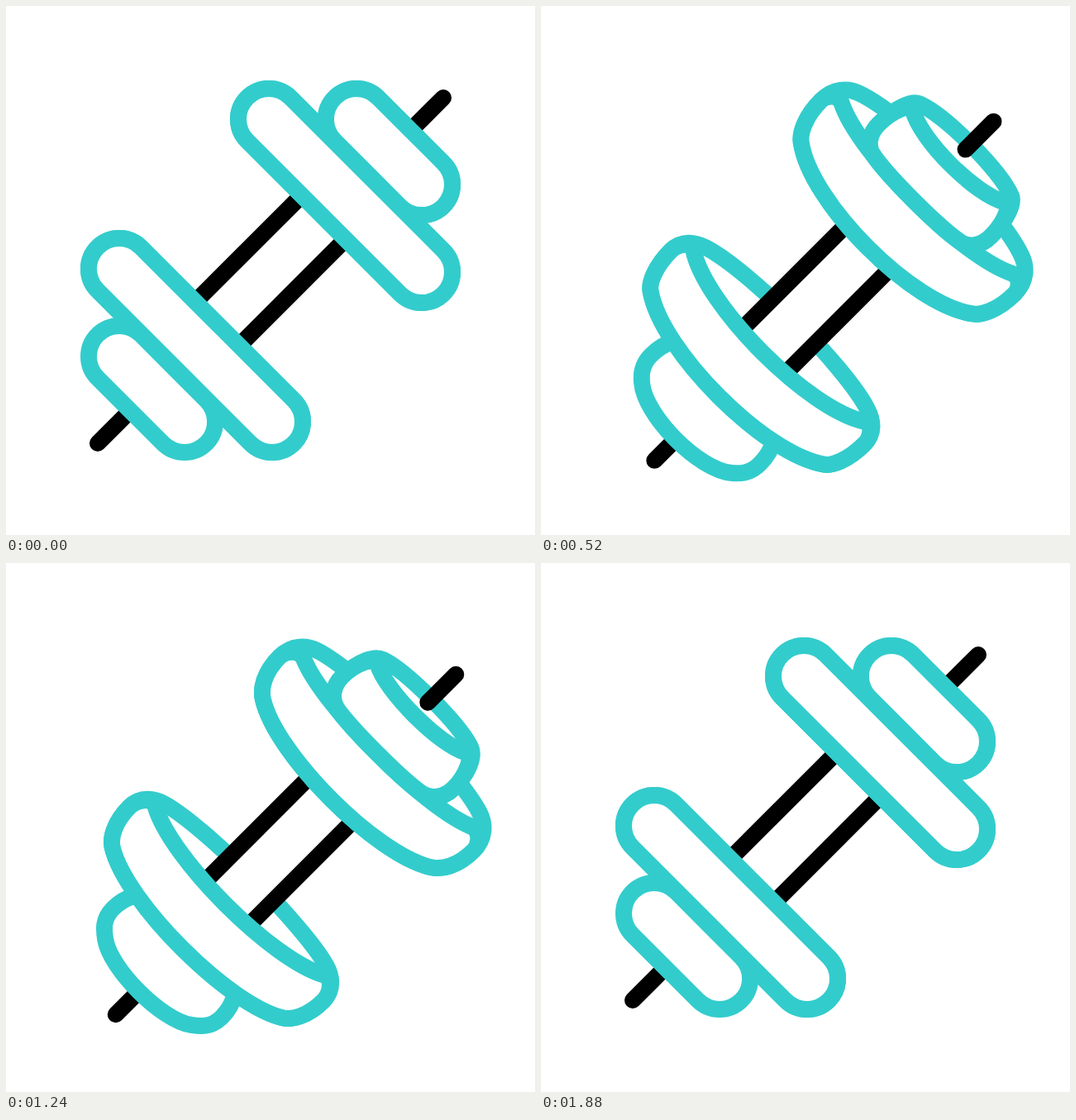
Write an HTML page that moves like this. It is 640x640 px and loops after 2400 ms.

```html
<!DOCTYPE html>
<html>
<head>
<meta charset="utf-8">
<style>
html, body { margin: 0; height: 100%; overflow: hidden; background: #fff; }
svg { display: block; width: 100vw; height: 100vh; }
path { fill: none; stroke-width: 20; stroke-linejoin: round; }
.plate { fill: #fff; stroke: #3cc; }
.bar { stroke: #000; }
.round { stroke-linecap: round; }
.grip { stroke: #fff; stroke-width: 75; }
</style>
</head>
<body>
<svg viewBox="0 0 640 640"><g id="dumbbell"></g></svg>
<script>
const group = document.getElementById('dumbbell');
const mix = (a, b, p) => a + (b - a) * p;
const ROUND = 0.5523;

// Local axes: u runs along the bar to the upper right, v across it.
// A plate is symmetric in v. Its pose is a left edge (u, half height, bulge),
// a tip (u, half height) and a right edge like the left one.
function capsule(u, half) {
  const r = 37;
  return [u - r, half, 0, u, half + r, u + r, half, 0];
}

// Curve handles of one side: the edge's own, and one carrying its tangent on to the tip
function handles(u, v, bulge, tipV) {
  const edge = [u + bulge * 4 / 3, v * 0.6];
  const du = u - edge[0], dv = v - edge[1];
  const reach = ROUND * (tipV - v) / Math.hypot(du, dv);
  return [edge, [u + du * reach, v + dv * reach]];
}

function outline([lu, lv, lBulge, tu, tv, ru, rv, rBulge]) {
  const [lEdge, lTip] = handles(lu, lv, lBulge, tv);
  const [rEdge, rTip] = handles(ru, rv, rBulge, tv);
  const half = [
    lEdge, [lu, lv], lTip, [mix(tu, lu, ROUND), tv], [tu, tv],
    [mix(tu, ru, ROUND), tv], rTip, [ru, rv], rEdge
  ];
  const mirrored = half.map(([u, v]) => [u, -v]).reverse();
  const loop = [...half, ...mirrored];
  return `M${loop[1]}C${[...loop.slice(2), loop[0], loop[1]].join(' ')}Z`;
}

const parts = [];
function add(className, path) {
  const el = document.createElementNS('http://www.w3.org/2000/svg', 'path');
  el.setAttribute('class', className);
  group.append(el);
  parts.push({ el, path });
}
const plate = (rest, ...turned) => {
  const pose = turned.flat();
  add('plate', p => outline(rest.map((n, i) => mix(n, pose[i], p))));
};
const rod = (className, v) =>
  add(className, p => `M${mix(-92, -109, p)},${v}H${mix(91, 71, p)}`);

const big = capsule(128, 130.8), small = capsule(202.9, 55.9);
const bigLow = capsule(-128, 130.8), smallLow = capsule(-202.9, 55.9);

// Left edge and tip of the turned plates, shared by the rim and the face behind it
const bigLeft = [109, 150, -39.5, 165, 165];
const lowLeft = [-147, 152, -38, -92, 165];
const smallLeft = [155.5, 79, -5.5, 185, 96.5];

// Back to front
add('bar round', p => `M${mix(-295.6, -291, p)},0H-250`);
plate(smallLow, [-235.5, 81, -23, -205, 93], [-162, 72, 0]);
plate(bigLow, lowLeft, [-61, 140, 16]);
rod('grip', 0);
rod('bar', -37.5);
rod('bar', 37.5);
plate(bigLow, lowLeft, [-76, 150, -34]);
plate(big, bigLeft, [203, 142, 19]);
plate(big, bigLeft, [176, 149, -26]);
plate(small, smallLeft, [240, 83, 11]);
add('bar round', p => `M${mix(295.6, 287, p)},0h-48`);
plate(small, smallLeft, [227, 83, -17]);

// cubic-bezier(.62, 0, .38, 1), solved around its midpoint
function ease(x) {
  x -= 0.5;
  let s = x;
  for (let i = 0; i < 8; i++) s -= (0.57 * s + 1.72 * s ** 3 - x) / (0.57 + 5.16 * s * s);
  return 0.5 + 1.5 * s - 2 * s ** 3;
}

const LOOP = 2400, PEAK = 780, END = 1880;
function turn(t) {
  if (t < PEAK) return ease(t / PEAK);
  return t < END ? 1 - ease((t - PEAK) / (END - PEAK)) : 0;
}

function draw() {
  const p = turn(performance.now() % LOOP);
  const c = 320 + 28 * p;
  group.setAttribute('transform', `translate(${c} ${c}) rotate(-45)`);
  for (const { el, path } of parts) el.setAttribute('d', path(p));
  requestAnimationFrame(draw);
}
draw();
</script>
</body>
</html>
```
